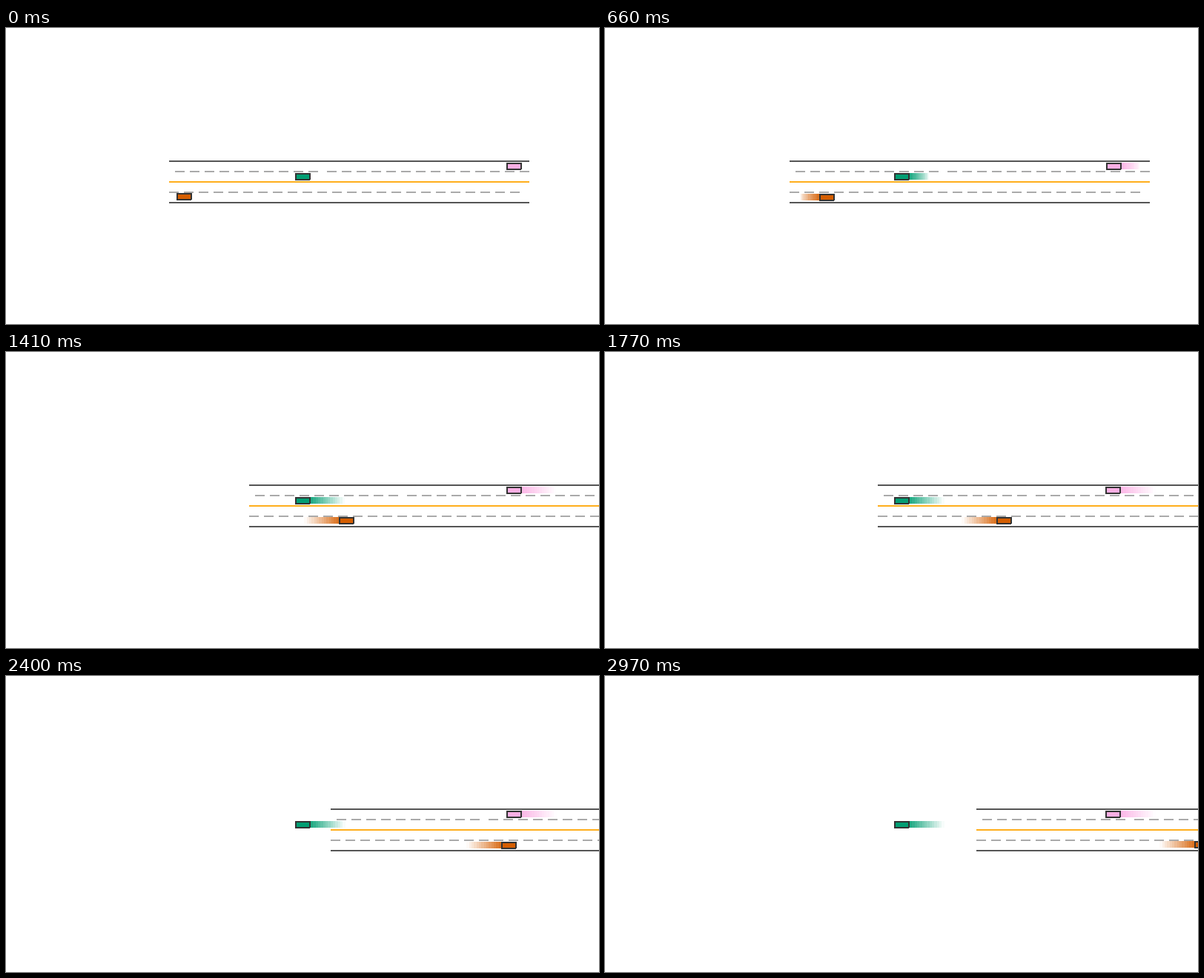
These frames come from a looping animation (800 by 400 pixels, 3000 ms). An HTML page with a canvas:

```html
<!DOCTYPE html>
<html lang="en">
<head>
<meta charset="utf-8">
<title>Traffic</title>
<style>
  html, body { margin: 0; width: 100%; height: 100%; overflow: hidden; background: #fff; }
  canvas { display: block; }
</style>
</head>
<body>
<canvas id="stage" width="800" height="400"></canvas>
<script>
const ctx = document.getElementById('stage').getContext('2d');
const STEP = 30, LOOP = 3000, STEPS = 99, TOP_SPEED = 10 / 3, TRAIL = 14;

// Distance driven per step, accelerating as v' = (1 - v^sharp) / ramp
function drive(ramp, sharp) {
  const path = [0], sub = 100;
  let v = 0, d = 0;
  for (let n = 1; n < STEPS; n++) {
    for (let i = 0; i < sub; i++) {
      const next = v + (1 - v ** sharp) / ramp / sub;
      d += TOP_SPEED * (v + next) / 2 / sub;
      v = next;
    }
    path.push(d);
  }
  return path;
}

const cars = [
  { x: 675.5, y: 182, dir: -1, color: '#fbafe4', path: drive(25.5, 6) },
  { x: 390, y: 196, dir: -1, color: '#029e73', path: drive(24, 4) },
  { x: 230, y: 223, dir: 1, color: '#d55e00', path: drive(24.5, 8), bob: 1 }
];
const camera = cars[1].path;

function box(color, x, y, w, h) {
  ctx.fillStyle = color;
  ctx.fillRect(x, y, w, h);
}

function dashes(x, y, count) {
  for (let i = 0; i < count; i++) box('#aaa', x + i * 20, y, 13, 2);
}

function drawRoad(x) {
  box('#555', x, 179, 486, 2);
  box('#ffae1c', x, 207, 486, 2);
  box('#555', x, 235, 486, 2);
  dashes(x + 8, 193, 10);
  dashes(x + 213, 193, 14);
  dashes(x, 221, 24);
}

function drawCar({ x, y, dir, color, path, bob }, n) {
  const left = Math.floor(x + camera[n] + dir * path[n]);
  const top = y + (bob ? n % 2 : 0);
  const rear = dir > 0 ? left : left + 21;
  const edge = age => Math.round(rear - dir * (path[n] - path[Math.max(0, n - age)]));

  for (let i = 0; i < TRAIL; i++) {
    const a = edge(i), b = edge(i + 1);
    ctx.globalAlpha = 0.9 * (1 - (i + 0.5) / TRAIL);
    box(color, Math.min(a, b), top, Math.abs(b - a), 9);
  }
  ctx.globalAlpha = 1;

  const line = '#333';
  box(color, left + 2, top + 2, 17, 6);
  box(line, left, top, 21, 2);
  box(line, left, top, 2, 10);
  box(line, left, top + 8, 20, 2);
  box(line, left + 19, top, 2, 9);
}

function draw(time) {
  // The parked first pose lasts two steps
  const n = Math.max(0, Math.floor((time % LOOP) / STEP + 1e-6) - 1);
  box('#fff', 0, 0, 800, 400);
  drawRoad(220 + Math.floor(camera[n]));
  cars.forEach(car => drawCar(car, n));
}

const start = performance.now();
function tick() {
  draw(performance.now() - start);
  requestAnimationFrame(tick);
}
tick();
</script>
</body>
</html>
```
